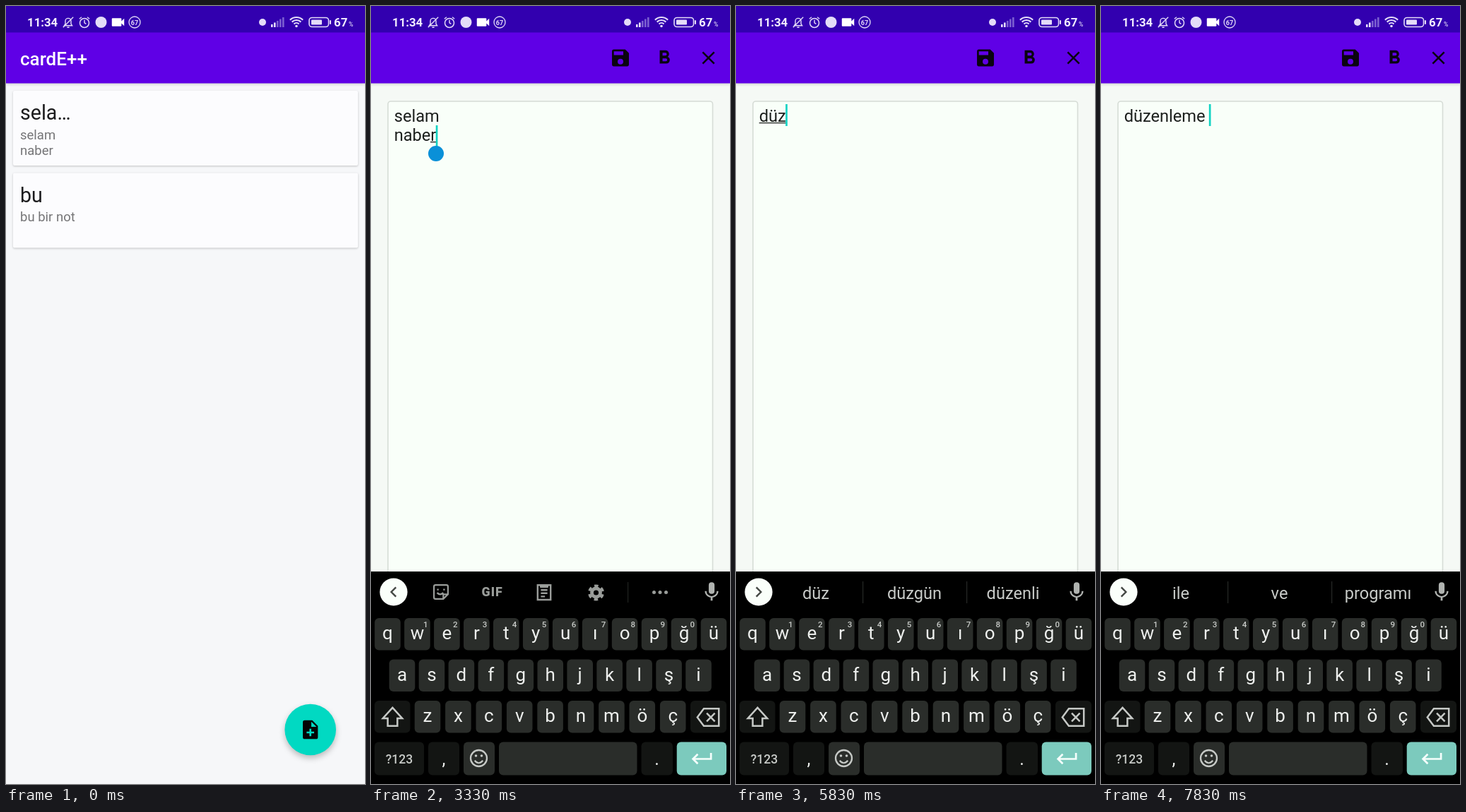
Animation, 508 px wide and 1102 px high, one loop 8000 ms. Source, as an HTML page with a canvas:

```html
<!DOCTYPE html>
<html lang="tr">
<head>
<meta charset="utf-8">
<style>
html, body { margin: 0; overflow: hidden; background: #f5f9f5; }
canvas { display: block; }
</style>
</head>
<body>
<canvas id="stage" width="508" height="1102"></canvas>
<script>
const c = document.getElementById('stage').getContext('2d');
const LOOP = 8000, W = 508;
const SLIDE = [970, 420], KEYBOARD = [2860, 330], HOLD = [3830, 5200], SPACE = [7420, 7540];
const clamp = v => Math.max(0, Math.min(1, v));
const easeOut = ([start, length], t) => 1 - (1 - clamp((t - start) / length)) ** 3;
const within = ([a, b], t) => t >= a && t < b;

// Drawing helpers
function rect(x, y, w, h, color, r = 0) {
  c.fillStyle = color;
  c.beginPath();
  c.roundRect(x, y, w, h, r);
  c.fill();
}
function circle(x, y, r, color, line = 0) {
  c.beginPath();
  c.arc(x, y, r, 0, Math.PI * 2);
  c.fillStyle = c.strokeStyle = color;
  c.lineWidth = line;
  line ? c.stroke() : c.fill();
}
function text(s, x, y, size, color, weight = 400, align = 'left') {
  c.font = `${weight} ${size}px Roboto, sans-serif`;
  c.textAlign = align;
  c.fillStyle = color;
  c.fillText(s, x, y);
}
// Paths live on a 24-unit grid centred on (x, y); a line width means stroke.
function icon(path, x, y, scale, color, line = 0) {
  c.save();
  c.translate(x, y);
  c.scale(scale, scale);
  c.translate(-12, -12);
  c.fillStyle = c.strokeStyle = color;
  c.lineWidth = line / scale;
  const p = new Path2D(path);
  line ? c.stroke(p) : c.fill(p, 'evenodd');
  c.restore();
}
function shadowed(blur, dy, alpha, draw) {
  c.save();
  c.shadowColor = `rgba(0,0,0,${alpha})`;
  c.shadowBlur = blur;
  c.shadowOffsetY = dy;
  draw();
  c.restore();
}

const ICON = {
  save: 'M17 3H5a2 2 0 0 0-2 2v14a2 2 0 0 0 2 2h14a2 2 0 0 0 2-2V7zM12 19a3 3 0 1 1 0-6 3 3 0 0 1 0 6zM15 9H5V5h10z',
  bold: 'M15.6 10.8A3.9 3.9 0 0 0 13.25 4H7v14h7a3.8 3.8 0 0 0 1.6-7.2zM10 6.5h3a1.5 1.5 0 0 1 0 3h-3zM13.5 15.5H10v-3h3.5a1.5 1.5 0 0 1 0 3z',
  add: 'M14 2H6a2 2 0 0 0-2 2v16a2 2 0 0 0 2 2h12a2 2 0 0 0 2-2V8zM16 16h-3v3h-2v-3H8v-2h3v-3h2v3h3zM13 9V3.5L18.5 9z',
  close: 'M6 6l12 12M18 6L6 18',
  video: 'M17 10.5V7a1 1 0 0 0-1-1H4a1 1 0 0 0-1 1v10a1 1 0 0 0 1 1h12a1 1 0 0 0 1-1v-3.5l4 4v-11z',
  bell: 'M5 18h14l-2-3v-5a5 5 0 0 0-10 0v5zM10 21h4M3 21L21 3',
  alarm: 'M12 8v5l3 2M3 6l4-3M21 6l-4-3',
  mic: 'M12 14a3 3 0 0 0 3-3V5a3 3 0 0 0-6 0v6a3 3 0 0 0 3 3zM17.3 11a5.3 5.3 0 0 1-10.6 0H5c0 3.4 2.7 6.2 6 6.7V21h2v-3.3c3.3-.5 6-3.3 6-6.7z',
  shift: 'M12 3L3 13h4.5v7h9v-7H21z',
  erase: 'M8 4H22V20H8L2 12zM10.7 8.2l7.6 7.6M18.3 8.2l-7.6 7.6',
  enter: 'M20 7v5H5M9 8l-4 4 4 4',
  sticker: 'M5 3H19a2 2 0 0 1 2 2V15l-6 6H5a2 2 0 0 1-2-2V5a2 2 0 0 1 2-2zM21 15h-6v6M8 8v2M16 8v2M7 13q4 4 8 0',
  clipboard: 'M4 4H20V22H4zM8 10h8M8 14h8M8 18h5M9 4h6'
};

function statusBar() {
  const ink = '#e4dcf8', dim = '#7b5fd0';
  text('11:34', 30, 29, 16.8, '#f2eeff', 700);
  icon(ICON.bell, 88, 23, .8, ink, 1.4);
  circle(111, 24, 6.5, ink, 1.5);
  icon(ICON.alarm, 111, 23, .8, ink, 1.4);
  circle(134.5, 23, 8, ink);
  icon(ICON.video, 158.5, 23, .97, '#fff');
  circle(182, 23, 8, ink, 1.3);
  text('67', 182, 26.5, 9, ink, 700, 'center');
  circle(363, 23, 5, ink);
  for (let i = 0; i < 5; i++) rect(375 + i * 4, 26 - i * 2.5, 2.6, 4 + i * 2.5, i < 2 ? ink : dim);
  c.strokeStyle = ink;
  c.lineWidth = 2.2;
  for (const r of [5, 9, 13]) {
    c.beginPath();
    c.arc(411, 29, r, -2.35, -.79);
    c.stroke();
  }
  circle(411, 28.5, 1.8, ink);
  c.lineWidth = 1.6;
  c.beginPath();
  c.roundRect(429, 16.5, 27.5, 13, 4);
  c.stroke();
  rect(432, 19.5, 15, 7, ink, 1);
  rect(458, 20, 2, 6, ink, 1);
  text('67', 464, 29, 16.8, '#f2eeff', 700);
  text('%', 485, 29, 8.5, ink, 500);
}

function page(color) {
  rect(0, 0, W, 1102, color);
  shadowed(4, 1, .16, () => rect(0, 37, W, 72.5, '#5f00e6'));
  rect(0, 0, W, 37.5, '#3200af');
}

function card(y, title, lines) {
  shadowed(3, 1, .22, () => rect(10, y, 488, 106, '#fcfcfe', 2));
  text(title, 20, y + 41, 28.6, '#1c1c1e');
  lines.forEach((s, i) => text(s, 20, y + 68.7 + i * 22, 18.5, '#757577'));
}

function listPage(t) {
  page('#f6f7f9');
  text('cardE++', 20, 83.5, 26, '#fff', 500);
  card(120, 'sela…', ['selam', 'naber']);
  card(236.5, 'bu', ['bu bir not']);
  const press = clamp((t - 830) / 250);
  if (press > 0) {
    c.save();
    c.beginPath();
    c.rect(10, 120, 488, 106);
    c.clip();
    circle(254, 174, 40 + 230 * press, 'rgba(0,0,0,.06)');
    c.restore();
  }
  shadowed(9, 4, .25, () => circle(430.7, 1025, 36.3, '#01d9c2'));
  icon(ICON.add, 430.7, 1025, 1.33, '#050505');
}

// Text entry: [press time, key]
const STROKES = [[5290, 'd'], [5460, 'ü'], [5640, 'z'], [5900, 'e'], [6060, 'n'], [6210, 'e'],
  [6380, 'k'], [6550, 'e'], [6760, 'm'], [7020, 'e']];
const HINTS = ['', 'de da daha', 'dü dün düşün', 'düz düzgün düzenli', 'düze düzenli düzey',
  'düzen düzenli düzenle', 'düzene düzenek düzenle', 'düzenek düzenle düzeneği',
  'düzeneke düzenle düzenleme', 'düzenekem düzenle düzenleme', 'düzenekeme düzenleme düzenlemeye'];
const NOTE = 'selam\nnaber';

function entry(t) {
  if (t >= SPACE[1]) return { value: 'düzenleme ', words: 'ile ve programı' };
  const typed = STROKES.filter(s => t >= s[0] + 110);
  if (typed.length) return { value: typed.map(s => s[1]).join(''), words: HINTS[typed.length], composing: true };
  const erased = (t >= 3900) + Math.max(0, Math.floor((t - 4170) / 66) + 1);
  return { value: NOTE.slice(0, Math.max(0, NOTE.length - erased)), words: '' };
}

function editorPage(t, state) {
  page('#f5f9f5');
  icon(ICON.save, 353, 73.5, 1.33, '#0a0410');
  icon(ICON.bold, 415.2, 73.5, 1.33, '#0a0410');
  icon(ICON.close, 477.5, 73.5, 1.36, '#0a0410', 2.6);
  rect(24, 135, 459.5, 943, '#f9fff9', 4);
  c.strokeStyle = '#d6dcd6';
  c.lineWidth = 1.6;
  c.stroke();

  const size = 23.6, lines = state.value.split('\n'), row = lines.length - 1;
  if (!state.value) text('Notunuzu giriniz', 33, 163.5, size, '#9a9f9b');
  lines.forEach((s, i) => text(s, 32.7, 163.5 + i * 27.5, size, '#1d201e'));
  if (t < 2830) return;
  const width = c.measureText(lines[row]).width, x = 32.7 + width;
  if (state.composing) rect(32.7, 165, width, 1.3, '#1d201e');
  if (state.value === NOTE) rect(84, 192, 9, 1.3, '#1d201e');
  rect(x - .6, 139 + row * 30, 2.7, 31, '#12d3c3');
  if (state.value === NOTE) circle(92, 209, 11, '#0a90d8');
}

// Keyboard geometry
const ROWS = [['qwertyuıopğü', 23.5, 41.95, 867], ['asdfghjklşi', 44, 41.95, 925.5], ['zxcvbnmöç', 80, 43.4, 984]];
const KEYS = ROWS.flatMap(([chars, x, step, y]) => [...chars].map((ch, i) => ({ ch, x: x + i * step, y })));
const PLAIN = '#2a2d2a', DARK = '#131513', LIGHT = '#eef0ee', GREY = '#9a9d9a';

function gear(x, y) {
  circle(x, y, 6, GREY, 4.8);
  c.setLineDash([5.4, 4.55]);
  c.lineDashOffset = 7.67;
  circle(x, y, 9.5, GREY, 4);
  c.setLineDash([]);
}

function topBar(words) {
  circle(32, 830, 19.6, '#fafffa');
  icon(words ? 'M9 6l6 6-6 6' : 'M15 6l-6 6 6 6', 32, 830, 1.1, '#444844', 2.4);
  icon(ICON.mic, 482, 830, 1.37, '#b0b3b0');
  if (words) {
    words.split(' ').forEach((s, i) => text(s, 113 + i * 139.5, 839.5, 23.6, '#c8cbc8', 400, 'center'));
    for (const x of [179, 326]) rect(x, 815, 1.2, 31, '#262926');
    return;
  }
  icon(ICON.sticker, 99, 830, 1.1, GREY, 2.2);
  c.letterSpacing = '1px';
  text('GIF', 171.7, 836, 17.8, GREY, 900, 'center');
  c.letterSpacing = '0px';
  icon(ICON.clipboard, 245, 829.5, 1.15, GREY, 2.4);
  rect(239, 819, 12, 5, GREY, 1);
  gear(318.5, 831);
  rect(363, 816, 1.2, 29, '#202320');
  for (const x of [400.5, 409, 417.5]) circle(x, 830.5, 2.5, GREY);
}

function keyboard(t, words) {
  rect(0, 801, W, 301, '#000');
  topBar(words);
  for (const { ch, x, y } of KEYS) {
    rect(x - 18.3, y, 36.6, 45.5, PLAIN, 6);
    text(ch, x, y + 30, 26, LIGHT, 400, 'center');
  }
  [...'1234567890'].forEach((d, i) => text(d, 77.2 + i * 41.95, 879.5, 11.5, '#c8cbc8', 500, 'center'));

  const held = within(HOLD, t);
  rect(5, 984, 50.5, 45.5, DARK, 6);
  icon(ICON.shift, 30.5, 1007.5, 1.52, '#c6c9c6', 2.5);
  rect(452, 984, 51, 45.5, held ? '#a9aca9' : DARK, 6);
  icon(ICON.erase, 477, 1007.5, 1.52, held ? '#dfe2df' : '#c6c9c6', 2.5);

  const bottom = (x, w, color) => rect(x, 1042.5, w, 47, color, 6);
  bottom(5, 70, DARK);
  text('?123', 40, 1072.5, 17.5, '#c6c9c6', 500, 'center');
  bottom(81, 44, DARK);
  text(',', 103, 1075, 25, LIGHT, 400, 'center');
  bottom(131, 44, PLAIN);
  circle(152.5, 1065.5, 11.5, '#c6c9c6', 2.3);
  circle(148.5, 1062, 1.8, '#c6c9c6');
  circle(156.5, 1062, 1.8, '#c6c9c6');
  icon('M7 14q5 6 10 0', 152.5, 1066.5, 1.15, '#c6c9c6', 2.2);
  bottom(181, 195.5, within(SPACE, t) ? '#5a5e5a' : PLAIN);
  bottom(382.5, 44.5, DARK);
  text('.', 404.5, 1075, 25, LIGHT, 400, 'center');
  bottom(432.7, 70.3, '#7ccabd');
  icon(ICON.enter, 467.5, 1066.5, 1.7, '#f6fffc', 2.7);

  const stroke = STROKES.find(([start]) => within([start, start + 140], t));
  if (stroke) {
    const key = KEYS.find(k => k.ch === stroke[1]);
    const x = Math.min(key.x, W - 25);
    rect(x - 24.8, key.y - 92, 49.6, 137, '#333633', 5);
    text(key.ch, x, key.y - 44, 34, LIGHT, 400, 'center');
  }
}

function render(t) {
  const slide = easeOut(SLIDE, t), state = entry(t);
  c.save();
  c.translate(-127 * slide, 0);
  if (slide < 1) listPage(t);
  c.restore();
  if (slide > 0) {
    if (slide < 1) rect(0, 37, W, 1065, `rgba(0,0,0,${.2 * slide})`);
    c.save();
    c.translate(W * (1 - slide), 0);
    editorPage(t, state);
    c.restore();
  }
  statusBar();
  const rise = easeOut(KEYBOARD, t);
  if (rise > 0) {
    c.save();
    c.translate(0, 301 * (1 - rise));
    keyboard(t, state.words);
    c.restore();
  }
}

const begin = performance.now();
function tick() {
  render((performance.now() - begin) % LOOP);
  requestAnimationFrame(tick);
}
tick();
</script>
</body>
</html>
```
